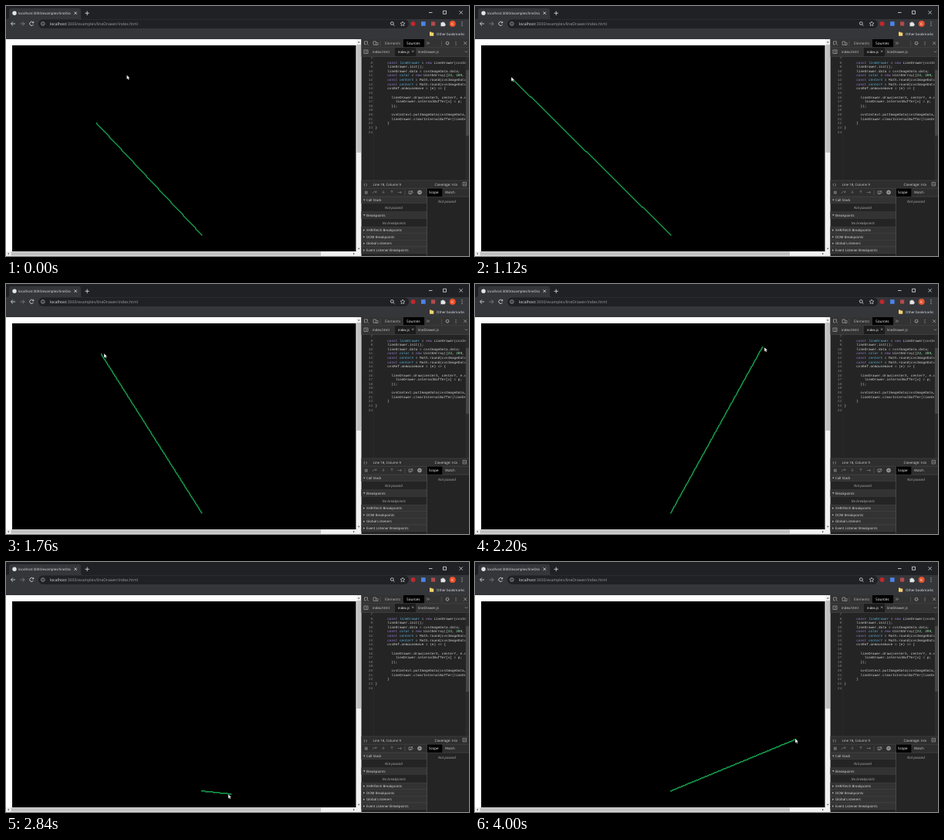
An HTML page for the animation above (4040 ms loop, 600 px wide and 324 px high).

```html
<!DOCTYPE html>
<html lang="en">
<head>
<meta charset="utf-8">
<title>Line drawer</title>
<style>
  html, body { margin: 0; width: 100%; height: 100%; overflow: hidden; background: #fff; }
  svg { display: block; width: 600px; height: 324px; }
  text { font-family: "Open Sans", sans-serif; text-rendering: geometricPrecision; white-space: pre; }
  .code text { font-family: "Liberation Mono", monospace; font-size: 4.36px; }
</style>
</head>
<body>
<svg viewBox="0 0 600 324">
  <defs><clipPath id="codeClip"><rect x="461" y="65" width="134.500" height="161"/></clipPath></defs>

  <!-- browser frame -->
  <rect width="600" height="43" fill="#35363a"/>
  <rect width="600" height="17" fill="#202124"/>
  <path d="M1 17q3 0 3-3V6q0-3 3-3H94q3 0 3 3v8q0 3 3 3z" fill="#35363a"/>
  <rect x="42" y="17.500" width="480" height="11.500" rx="5.750" fill="#202124"/>
  <g fill="none" stroke="#e3e4e6" stroke-width=".8">
    <path d="M88.500 7.500l3.400 3.400m0-3.400l-3.400 3.400M102.500 9.300h5.400m-2.700-2.700v5.400"/>
    <path d="M548 8.500h4.500M566.500 6.300h4v4h-4zM587.500 6.300l4.200 4.200m0-4.200l-4.200 4.200"/>
    <path d="M12 23H6.500m2.500-2.600L6.400 23 9 25.600"/>
    <path d="M18.500 23H24m-2.500-2.600l2.600 2.600-2.600 2.600" stroke="#85868a"/>
    <path d="M35.200 21.400a2.500 2.500 0 1 0 .3 2.500m.2-3.800v1.800h-1.800"/>
    <circle cx="47.800" cy="23" r="2.300" stroke="#a5a7aa"/>
    <path d="M47.800 22.700v1.500m0-2.700v.5" stroke="#a5a7aa"/>
    <circle cx="500.300" cy="22.500" r="1.900"/>
    <path d="M501.700 24l1.700 1.700"/>
    <path d="M514 20l.9 2 2.100.2-1.600 1.400.5 2.100-1.900-1.100-1.900 1.100.5-2.100-1.600-1.400 2.100-.2z" stroke-width=".6"/>
  </g>
  <g>
    <circle cx="11" cy="9.300" r="2.700" fill="#e3e4e6"/>
    <circle cx="527.500" cy="23" r="3" fill="#c0272d"/>
    <rect x="538" y="20.200" width="5.600" height="5.600" fill="#4b84e8"/>
    <rect x="551" y="20.400" width="5.200" height="5.200" fill="#b34a4a"/>
    <path d="M563.500 21.500h1.700a1 1 0 0 1 2 0h1.600v1.700a1 1 0 0 1 0 2v1h-5.300z" fill="#e3e4e6"/>
    <circle cx="578.700" cy="23" r="4" fill="#e8502a"/>
    <path d="M591 20.300v.9m0 1.400v.9m0 1.400v.9" stroke="#e3e4e6" stroke-width="1"/>
    <path d="M549 33.500h2l.8.900h2.400v4.300H549z" fill="#f6d36b"/>
  </g>

  <!-- page -->
  <rect y="43" width="461" height="281" fill="#fff"/>
  <rect x="8" y="51" width="445.500" height="267" fill="#000"/>
  <rect x="454" y="43" width="6.500" height="275" fill="#f1f1f1"/>
  <rect x="454.500" y="50" width="5.500" height="140" fill="#c1c1c1"/>
  <rect y="318" width="460.500" height="6" fill="#f1f1f1"/>
  <rect x="6.500" y="318.500" width="401.500" height="5" fill="#c1c1c1"/>
  <path d="M455.700 47.600l1.500-1.800 1.500 1.800zM455.700 313.700l1.500 1.800 1.500-1.800zM3.800 319.500l-1.800 1.500 1.800 1.500zM450 319.500l1.800 1.500-1.800 1.500z" fill="#606060"/>
  <path id="line" fill="#17a24e"/>
  <path id="cursor" d="M0 0v5.500l1.300-1.100.9 1.900 1-.5-.9-1.800h1.700z" fill="#fff" stroke="#222" stroke-width=".3"/>

  <!-- developer tools -->
  <rect x="460.500" y="43" width="139.500" height="281" fill="#242424"/>
  <rect x="460.500" y="43" width="139.500" height="22.500" fill="#333"/>
  <rect x="515" y="43" width="27" height="10.500" fill="#000"/>
  <rect x="504" y="54" width="27" height="11.500" fill="#1c1c1c"/>
  <path d="M460.500 53.700H600M460.500 65.500H600" stroke="#494949" stroke-width=".6"/>
  <g fill="none" stroke="#aaa" stroke-width=".7">
    <path d="M468.500 48.700v-2.800h-4v4h2.500M467.500 48.500l2.300 2.300M476 46h3.500v4.300H476zM480.500 47.500h1.500v3h-2.500"/>
    <path d="M485 45v7M564.500 45v7" stroke="#555"/>
    <path d="M545 46.500l1.600 1.600-1.600 1.600m2-3.200l1.600 1.600-1.600 1.600"/>
    <circle cx="572" cy="48.200" r="1.800" stroke-width="1.200" stroke-dasharray="1 .4"/>
    <path d="M583 46v.9m0 1v.9m0 1v.9" stroke-width="1"/>
    <path d="M593.200 46.200l4 4m0-4l-4 4"/>
    <rect x="464" y="57" width="5" height="4.500"/>
    <path d="M466 58l1.500 1.300-1.500 1.300M526 57.500l2.400 2.400m0-2.400l-2.400 2.400M595 58.500l1.500 1.500 1.500-1.500"/>
  </g>
  <path d="M476.300 65.800V226" stroke="#333" stroke-width=".5"/>
  <g id="code" class="code" clip-path="url(#codeClip)"></g>
  <rect x="595.500" y="66" width="4.500" height="160" fill="#2b2b2b"/>
  <rect x="596" y="83" width="4" height="85" fill="#454545"/>

  <rect x="460.500" y="226" width="139.500" height="21.500" fill="#2e2e2e"/>
  <path d="M460.500 226H600M460.500 236.300H600M460.500 247H600" stroke="#494949" stroke-width=".6"/>
  <rect x="545.300" y="236.600" width="20" height="10.300" fill="#000"/>
  <g fill="none" stroke="#a0a0a0" stroke-width=".7">
    <path d="M465.800 239.700v4M467.800 239.700v4" stroke-width="1"/>
    <path d="M475 243q2-4.500 5-1.700m0-1.800v2h-2" stroke="#777"/>
    <path d="M489 239v3.500m-1.500-1.500l1.500 1.500 1.500-1.500M500 242.500V239m-1.500 1.500l1.500-1.500 1.500 1.500M507.500 241.500h5m-1.500-1.500l1.500 1.500-1.500 1.500" stroke="#777"/>
    <path d="M517 238.500v7" stroke="#555"/>
    <path d="M522 240h4l1.500 1.600-1.500 1.600h-4zM523 244.500l4-5.500"/>
    <circle cx="536" cy="241.500" r="2.500" fill="#a0a0a0"/>
    <path d="M535.200 240.400v2.200m1.600-2.200v2.200" stroke="#2e2e2e"/>
    <path d="M592 228.500h4.500v4.500H592zM593 231.700l1.200-1.700 1.300 1.700"/>
  </g>
  <g id="panes"></g>
  <path d="M545.300 236.500V324" stroke="#555" stroke-width=".7"/>
  <g id="labels"></g>
</svg>
<script>
const NS = 'http://www.w3.org/2000/svg';
const $ = id => document.getElementById(id);

function add(parent, tag, attrs, content = '') {
  const el = document.createElementNS(NS, tag);
  for (const k in attrs) el.setAttribute(k, attrs[k]);
  el.textContent = content;
  parent.appendChild(el);
  return el;
}

function label(x, y, str, size = 4.4, fill = '#d6d6d6', style = 'normal') {
  return add($('labels'), 'text', { x, y, fill, 'font-size': size, 'font-style': style }, str);
}

label(16, 10.9, 'localhost:3000/examples/lineDra', 4.45, '#e3e4e6');
const url = label(57, 24.8, '', 5.1, '#9aa0a6');
add(url, 'tspan', { fill: '#e8eaed' }, 'localhost');
add(url, 'tspan', {}, ':3000/examples/lineDrawer/index.html');
label(576.9, 24.8, 'K', 5, '#fff');
label(558, 37.8, 'Other bookmarks', 4.4, '#e8eaed');
label(491, 50, 'Elements', 4.7, '#b5b5b5');
label(519, 50, 'Sources', 4.8, '#fff');
label(475, 61.2, 'index.html');
label(508, 61.2, 'index.js', 4.25, '#fff');
label(534, 61.2, 'lineDrawer.js');
label(463.5, 232.8, '{ }', 4.4);
label(475.5, 232.8, 'Line 18, Column 9');
label(555.5, 232.8, 'Coverage: n/a', 4.6);
label(548, 243.3, 'Scope', 4.5, '#fff');
label(569, 243.3, 'Watch', 4.4);
label(491, 262.9, 'Not paused', 4.5, '#b0b0b0', 'italic');
label(487.500, 282.600, 'No breakpoints', 4.5, '#b0b0b0', 'italic');
label(560, 255, 'Not paused', 4.5, '#b0b0b0', 'italic');

// Collapsible panes: name, middle, open
[['Call Stack', 251.5, 1], ['Breakpoints', 271, 1], ['XHR/fetch Breakpoints', 290.3],
 ['DOM Breakpoints', 299], ['Global Listeners', 307.5], ['Event Listener Breakpoints', 316.2]]
.forEach(([name, y, open]) => {
  const g = $('panes');
  add(g, 'rect', { x: 460.5, y: y - 4.2, width: 84.8, height: 8.4, fill: '#333', stroke: '#494949', 'stroke-width': .4 });
  add(g, 'path', { d: `M463 ${y - 1}` + (open ? 'h2.600l-1.300 2.200z' : 'l2.200 1.300-2.200 1.300z'), fill: '#aaa' });
  label(467, y + 1.6, name, 4.4, '#e0e0e0');
});

const source = `
      const lineDrawer = new LineDrawer(cvsImageData
      lineDrawer.init();
      lineDrawer.data = cvsImageData.data;
      const color = new Uint8Array([22, 209, 
      const centerX = Math.round(cvsImageData
      const centerY = Math.round(cvsImageData
      cvsRef.onmousemove = (e) => {

        lineDrawer.draw(centerX, centerY, e.o
          lineDrawer.internalBuffer[x] = p;
        });

        cvsContext.putImageData(cvsImageData, 
        lineDrawer.clearInternalBuffer(lineDr
      }
}
`.split('\n');

source.forEach((row, i) => {
  const y = 68.9 + i * 5.63;
  add($('code'), 'text', { x: 475, y, fill: '#8a8a8a', 'text-anchor': 'end' }, i + 7);
  const indent = row.search(/\S/);
  if (indent < 0) return;
  const t = add($('code'), 'text', { x: 478.5 + indent * 2.616, y, fill: '#d4d4d4' });
  let declared = false;
  for (const part of row.trim().split(/(\bconst\b|\bnew\b|\b\d+\b|\s+)/)) {
    if (!part) continue;
    const keyword = part === 'const' || part === 'new';
    const name = declared && part.trim();
    const fill = keyword ? '#9a7fd5' : /^\d+$/.test(part) ? '#a1f7b5' : name ? '#5db0d7' : '#d4d4d4';
    add(t, 'tspan', { fill }, part);
    if (part === 'const') declared = true;
    else if (name) declared = false;
  }
});

// Pointer path: time, x, y
const path = [
  [80, 116.5, 151], [290, 116.5, 151], [440, 95, 147], [640, 53, 132], [840, 48, 128.5],
  [1000, 48, 112], [1120, 47, 92], [1400, 34.5, 75], [1480, 28.5, 69.5], [1600, 52, 78],
  [1760, 127, 90], [1960, 251, 80], [2200, 375, 82], [2360, 409, 135], [2520, 413.5, 238],
  [2840, 288, 301], [3080, 217, 309.5], [3240, 130, 301], [3380, 60, 280],
  [3480, 84, 263], [3640, 197, 265], [4000, 415, 229]
];
const LOOP = 4040, STEP = 40, LAG = 8;
const origin = [253, 296];

function slope(i, k) {
  const a = path[i - 1], b = path[i], c = path[i + 1];
  if (!a || !c || (b[k] - a[k]) * (c[k] - b[k]) <= 0) return 0;
  return (c[k] - a[k]) / (c[0] - a[0]);
}

function pointer(t) {
  let i = 0;
  while (i < path.length - 2 && t > path[i + 1][0]) i++;
  const a = path[i], b = path[i + 1], d = b[0] - a[0];
  const u = Math.min(1, Math.max(0, (t - a[0]) / d)), v = 1 - u;
  return [1, 2].map(k =>
    a[k] * v * v * (1 + 2 * u) + b[k] * u * u * (3 - 2 * u) +
    d * u * v * (slope(i, k) * v - slope(i + 1, k) * u));
}

// Stepped line, one square per pixel along the longer axis
function stairs([x0, y0], [x1, y1]) {
  const dx = x1 - x0, dy = y1 - y0;
  const n = Math.max(1, Math.round(Math.max(Math.abs(dx), Math.abs(dy))));
  let d = '';
  for (let i = 0; i <= n; i++) {
    d += `M${Math.round(x0 + dx * i / n)} ${Math.round(y0 + dy * i / n)}h1.400v1.400h-1.400z`;
  }
  return d;
}

function draw(ms) {
  const t = Math.floor((ms % LOOP) / STEP) * STEP;
  let [x, y] = pointer(t);
  if (t < 80) {
    const back = 1 - t / 80;
    x += 40 * back;
    y -= 61.5 * back;
  }
  $('cursor').setAttribute('transform', `translate(${x.toFixed(2)} ${y.toFixed(2)})`);
  $('line').setAttribute('d', stairs(origin, pointer(t - LAG)));
}

const start = performance.now();
function tick() {
  draw(performance.now() - start);
  requestAnimationFrame(tick);
}
tick();
</script>
</body>
</html>
```
